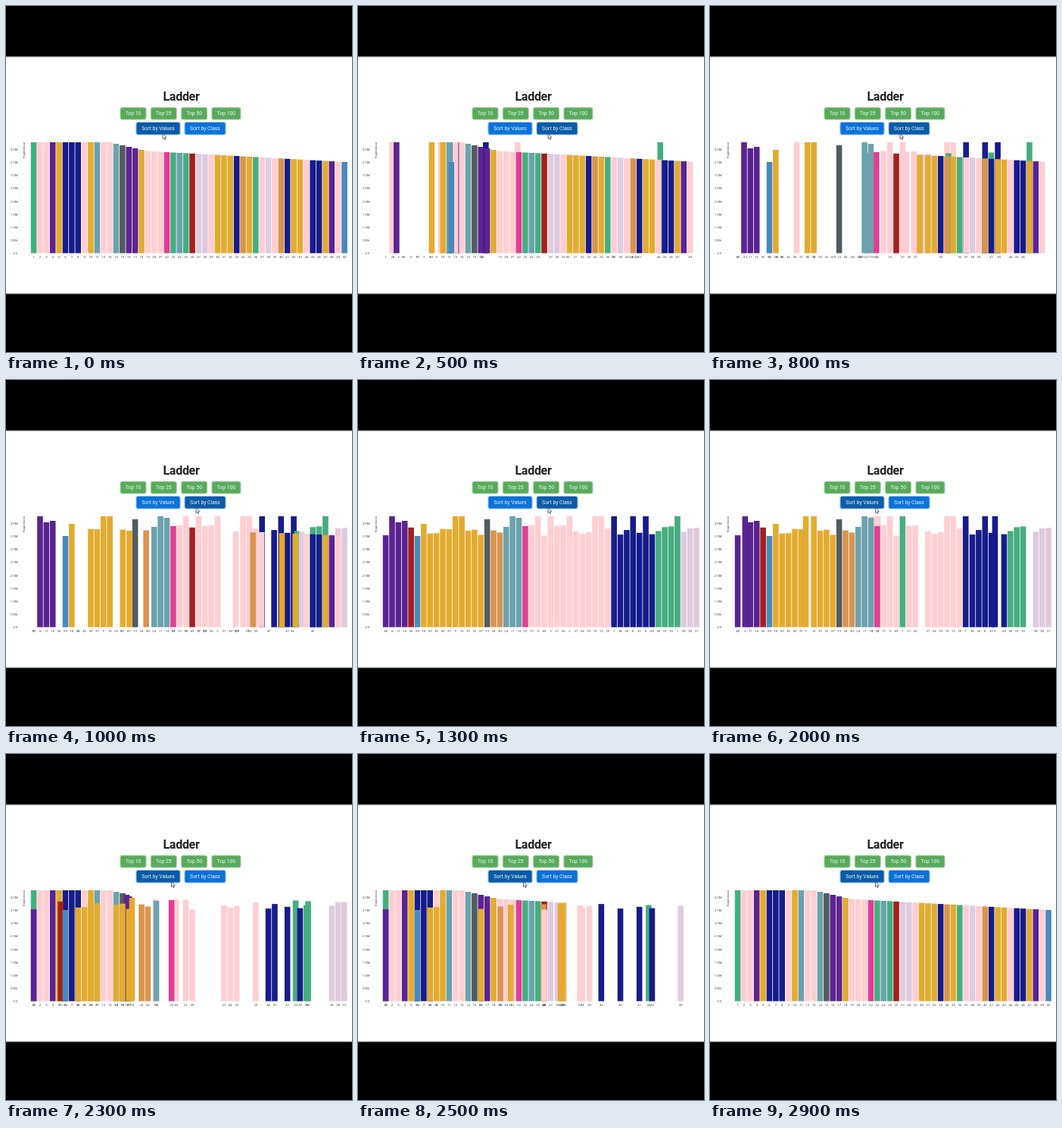
Write an HTML page with a canvas that moves like this. It is 457 by 457 pixels and loops after 3000 ms.

```html
<!DOCTYPE html>
<html lang="en">
<head>
<meta charset="utf-8">
<title>Ladder</title>
<style>
  html, body { margin: 0; width: 100%; height: 100%; overflow: hidden; background: #000; }
  canvas { display: block; }
</style>
</head>
<body>
<canvas id="stage" width="457" height="457"></canvas>
<script>
const ctx = document.getElementById('stage').getContext('2d');

const LOOP = 3000, STEP = 100;
const SPEED = 3.33, DURATION = 750, STAGGER = 50;
const CLASS_SORT = 330, VALUE_SORT = 1892.5;
const BASE = 326.5;
const SMALL = '4.3px Roboto, sans-serif';

// Class colours in class order, then the class of each rank
const palette = {
  P: '#5b2391', R: '#a3201c', B: '#4a88bb', G: '#e3ab2f', S: '#515c61', O: '#d9954e',
  T: '#6ba3ad', M: '#df3f96', K: '#ffced2', N: '#171c8c', E: '#45ae80', L: '#dfcbe0',
};
const ranking = 'EKKPGNNNKGTKKTSPPGKKKMETERLLKGGGNOGEKLKONGGKNNGPKB';

// Unstable median-of-three quicksort: it decides how equal items get shuffled
function quickSort(a, compare, from = 0, to = a.length) {
  if (to - from <= 10) {
    for (let i = from + 1; i < to; i++) {
      const item = a[i];
      let j = i - 1;
      for (; j >= from && compare(a[j], item) > 0; j--) a[j + 1] = a[j];
      a[j + 1] = item;
    }
    return a;
  }
  const swap = (i, j) => { [a[i], a[j]] = [a[j], a[i]]; };
  const mid = from + ((to - from) >> 1);
  let low = a[from], pivot = a[to - 1], high = a[mid];
  if (compare(low, pivot) > 0) [low, pivot] = [pivot, low];
  if (compare(low, high) >= 0) [low, pivot, high] = [high, low, pivot];
  else if (compare(pivot, high) > 0) [pivot, high] = [high, pivot];
  a[from] = low;
  a[to - 1] = high;
  let lowEnd = from + 1, highStart = to - 1;
  a[mid] = a[lowEnd];
  a[lowEnd] = pivot;

  for (let i = lowEnd + 1; i < highStart; i++) {
    let order = compare(a[i], pivot);
    if (order > 0) {
      do highStart--; while (highStart > i && (order = compare(a[highStart], pivot)) > 0);
      if (highStart === i) break;
      swap(i, highStart);
    }
    if (order < 0) swap(i, lowEnd++);
  }
  quickSort(a, compare, from, lowEnd);
  return quickSort(a, compare, highStart, to);
}

const topOf = rank => Math.max(180, Math.min(154 + 2 * rank, 182.8 + 0.464 * rank));
const bars = [...ranking].map((key, i) => ({
  rank: i + 1, color: palette[key], top: topOf(i + 1), group: Object.keys(palette).indexOf(key),
}));
quickSort([...bars], (a, b) => a.group - b.group).forEach((bar, i) => { bar.slot = i; });
// The bars' starting order comes from a sort that cannot compare them
quickSort([...bars], () => NaN).forEach((bar, i) => { bar.turn = i; });

const clamp = v => Math.min(1, Math.max(0, v));
const mix = (a, b, p) => a + (b - a) * p;
const cubicInOut = t => t < 0.5 ? 4 * t ** 3 : 1 - 4 * (1 - t) ** 3;
const slotX = slot => 36.6 + 8.377 * slot;

function moved(now, start, turn) {
  return cubicInOut(clamp(((now - start) * SPEED - turn * STAGGER) / DURATION));
}

function xAt(now, bar, turn) {
  const p = now < VALUE_SORT
    ? moved(now, CLASS_SORT, turn)
    : 1 - moved(now, VALUE_SORT, bar.rank - 1);
  return mix(slotX(bar.rank - 1), slotX(bar.slot), p);
}

function text(str, x, y, font, color, align = 'center') {
  ctx.font = font;
  ctx.fillStyle = color;
  ctx.textAlign = align;
  ctx.fillText(str, x, y);
}

function button(label, x, y, w, h, color, halo) {
  ctx.beginPath();
  ctx.roundRect(x, y, w, h, 2);
  ctx.strokeStyle = halo;
  ctx.lineWidth = 2.2;
  ctx.stroke();
  ctx.fillStyle = color;
  ctx.fill();
  text(label, x + w / 2, y + h / 2 + 2.3, '6.8px Roboto, sans-serif', '#eef6fb');
}

function drawHeader(now) {
  ctx.letterSpacing = '-0.3px';
  text('Ladder', 231.5, 124.6, 'bold 16px Roboto, sans-serif', '#222');
  ctx.letterSpacing = '0px';
  [10, 25, 50, 100].forEach((n, i) =>
    button('Top ' + n, 151.5 + 40.3 * i, 134.5, n < 100 ? 33 : 37, 15, '#59ab5b', '#a9d8aa'));
  const byClass = now >= 300 && now < 1800;
  const blue = active => active ? '#0c5ba6' : '#0b72d8';
  button('Sort by Values', 172.5, 154, 57, 15.5, blue(!byClass), '#8fc0f0');
  button('Sort by Class', 236.5, 154, 53, 15.5, blue(byClass), '#8fc0f0');
}

function drawAxis() {
  for (let i = 0; i <= 8; i++) {
    const label = i === 1 ? '500k' : (i / 2).toFixed(1) + (i ? 'M' : '');
    text(label, 15.5, 328.3 - i * 17.2, SMALL, '#555', 'right');
  }
  ctx.save();
  ctx.translate(25, 180);
  ctx.rotate(-Math.PI / 2);
  text('Experience', 0, 0, SMALL, '#444', 'right');
  ctx.restore();
}

function drawBars(now) {
  for (const bar of bars) {
    ctx.fillStyle = bar.color;
    ctx.fillRect(xAt(now, bar, bar.turn) - 3.8, bar.top, 7.6, BASE - bar.top);
  }
  for (const bar of bars) text(bar.rank, xAt(now, bar, bar.slot), 333.2, SMALL, '#444');
}

function drawCursor(now) {
  const x = now < 1500
    ? mix(207, 251, clamp((now - 100) / 200))
    : mix(251, 218.5, clamp((now - 1500) / 300));
  ctx.save();
  ctx.translate(x, 168.5);
  const arrow = new Path2D('M0 0V7L1.6 5.6 2.8 8.2 3.8 7.6 2.8 5.2 4.8 5Z');
  ctx.fillStyle = '#fff';
  ctx.strokeStyle = '#445';
  ctx.lineWidth = 0.8;
  ctx.fill(arrow);
  ctx.stroke(arrow);
  ctx.restore();
}

function draw(now) {
  ctx.fillStyle = '#000';
  ctx.fillRect(0, 0, 457, 457);
  ctx.fillStyle = '#8b9a9a';
  ctx.fillRect(0, 66.5, 457, 314);
  ctx.fillStyle = '#fff';
  ctx.fillRect(0, 67.5, 457, 312);
  drawHeader(now);
  drawAxis();
  drawBars(now);
  drawCursor(now);
}

const begin = performance.now();
function frame() {
  const elapsed = (performance.now() - begin) % LOOP;
  draw(Math.floor(elapsed / STEP) * STEP);
  requestAnimationFrame(frame);
}
frame();
</script>
</body>
</html>
```
